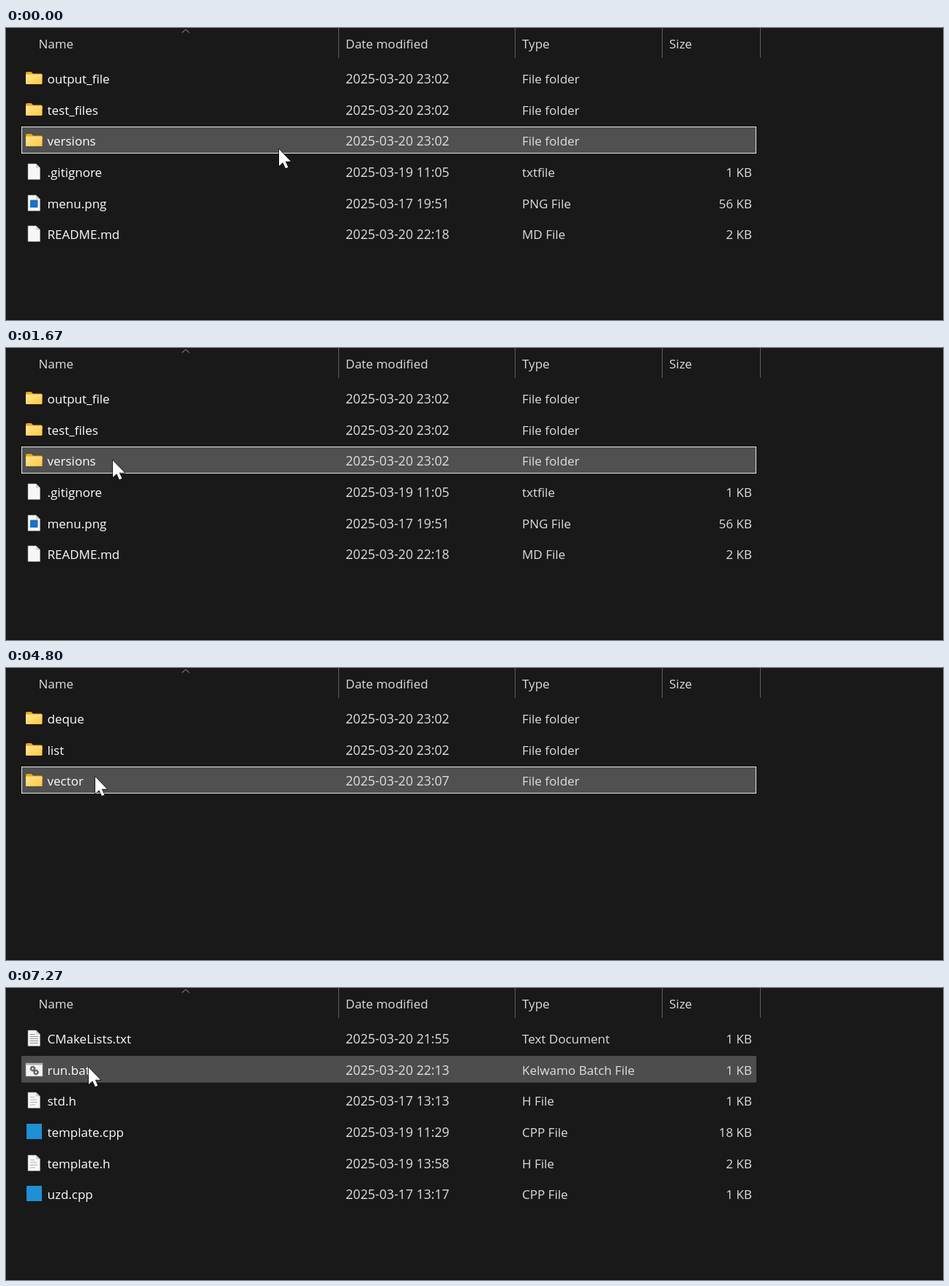
An HTML page that plays this animation: 1280x400 px, repeating every 8000 ms.

```html
<!DOCTYPE html>
<html lang="en">
<head>
<meta charset="utf-8">
<title>File list</title>
<style>
  html, body { margin: 0; width: 100%; height: 100%; overflow: hidden; background: #191919; }
  svg { display: block; }
  text { font: 17px "Open Sans", "Noto Sans", sans-serif; fill: #dedede; white-space: pre; }
  .name { fill: #fff; }
  .date { font-size: 17.65px; }
  .size { text-anchor: end; }
</style>
</head>
<body>
<svg width="1280" height="400" viewBox="0 0 1280 400">
  <defs>
    <linearGradient id="gold" x2="1" y2="1">
      <stop offset="0" stop-color="#ffe59a"/><stop offset="1" stop-color="#ffc83d"/>
    </linearGradient>
    <g id="folder">
      <path d="M27 11.5q0-1.5 1.5-1.5h6l2.5 2.5h11q1.5 0 1.5 1.5v4H27z" fill="#eba50f"/>
      <rect x="27" y="13.5" width="22.5" height="13.5" rx="1.3" fill="url(#gold)"/>
    </g>
    <g id="sheet">
      <path d="M30 8h11l5.500 5.500V29.500H30z" fill="#f7f7f7" stroke="#9a9a9a" stroke-width=".6"/>
      <path d="M41 8v5.500h5.500z" fill="#cfcfcf"/>
    </g>
    <g id="notes">
      <use href="#sheet"/>
      <path d="M32.500 13.500h7M32.500 16.500h11.500M32.500 19.500h11.500M32.500 22.500h11.500M32.500 25.500h11.500" stroke="#8c8c8c"/>
    </g>
    <g id="source">
      <use href="#sheet"/>
      <path d="M33 14.500h6M33 18h9M33 21.500h10M33 25h7" stroke="#b4b4b4"/>
    </g>
    <g id="image">
      <use href="#sheet"/>
      <rect x="33" y="14.500" width="10.500" height="10.500" rx="1" fill="#1a72c4"/>
    </g>
    <g id="batch">
      <rect x="27" y="10" width="23" height="18" fill="#f4f4f4" stroke="#8a8a8a" stroke-width=".7"/>
      <path d="M27.500 11.500h22" stroke="#a9a9a9" stroke-width="2"/>
      <g fill="none" stroke="#555">
        <circle cx="36.500" cy="17.500" r="2.300" stroke-width="1.700"/>
        <circle cx="36.500" cy="17.500" r="3.600" stroke-dasharray="1.400 1.430"/>
        <circle cx="41" cy="22.500" r="2.300" stroke-width="1.700"/>
        <circle cx="41" cy="22.500" r="3.600" stroke-dasharray="1.400 1.430"/>
      </g>
    </g>
    <rect id="code" x="28" y="8" width="21" height="21" fill="#1f8fd6"/>
  </defs>
  <rect width="1280" height="400" fill="#191919"/>
  <rect y="398" width="1280" height="2" fill="#141414"/>
  <g id="header">
    <path d="M240.500 6.500l5-4.500 5 4.500" fill="none" stroke="#a0a0a0"/>
    <path d="M454.500 0V41M695.500 0V41M896.500 0V41M1030.500 0V41" stroke="#5e5e5e"/>
    <text x="44.500" y="28">Name</text>
    <text x="464" y="28">Date modified</text>
    <text x="705" y="28">Type</text>
    <text x="906" y="28">Size</text>
  </g>
  <g id="bars"></g>
  <g id="lists"></g>
  <path id="cursor" d="M0 0V23L5.200 18.200 8.900 26.300 12.400 24.800 8.800 16.800H16z" fill="#fff" stroke="#000" stroke-width="1.200" paint-order="stroke"/>
</svg>
<script>
const LOOP = 8000, FPS = 15;
const $ = id => document.getElementById(id);
const rowTop = i => 50 + i * 42.67;

// icon, name, modified, type, size
const folder = (name, time) => ["folder", name, "2025-03-20 " + time, "File folder", ""];
const lists = [
  [
    folder("output_file", "23:02"),
    folder("test_files", "23:02"),
    folder("versions", "23:02"),
    ["sheet", ".gitignore", "2025-03-19 11:05", "txtfile", "1 KB"],
    ["image", "menu.png", "2025-03-17 19:51", "PNG File", "56 KB"],
    ["sheet", "README.md", "2025-03-20 22:18", "MD File", "2 KB"]
  ],
  [folder("deque", "23:02"), folder("list", "23:02"), folder("vector", "23:07")],
  [
    ["notes", "CMakeLists.txt", "2025-03-20 21:55", "Text Document", "1 KB"],
    ["batch", "run.bat", "2025-03-20 22:13", "Kelwamo Batch File", "1 KB"],
    ["source", "std.h", "2025-03-17 13:13", "H File", "1 KB"],
    ["code", "template.cpp", "2025-03-19 11:29", "CPP File", "18 KB"],
    ["source", "template.h", "2025-03-19 13:58", "H File", "2 KB"],
    ["code", "uzd.cpp", "2025-03-17 13:17", "CPP File", "1 KB"]
  ]
];

// start, visible list, selected row, reacts to the pointer
const states = [
  [0, 0, 2, true],
  [2400, 1, -1, false],
  [2533, 1, -1, true],
  [4800, 1, 2, true],
  [5000, -1, -1, false],
  [5133, 2, -1, false],
  [5267, 2, -1, true]
];

// time, x, y of the pointer tip
const path = [
  [0, 373, 166], [133, 373, 166], [733, 332, 307], [867, 328, 313], [1000, 315, 304],
  [1667, 146, 154], [2933, 146, 154], [3067, 143, 128], [3467, 138, 76],
  [3733, 138, 76], [3933, 138, 98], [4467, 122, 149],
  [5867, 122, 149], [6467, 113, 75], [6867, 113, 75], [7267, 113, 109], [LOOP, 113, 109]
];

const cell = (cls, x, y, str) => `<text class="${cls}" x="${x}" y="${y}">${str}</text>`;

function rowMarkup([icon, name, date, type, size], i) {
  const y = Math.round(rowTop(i) + 26);
  return `<use href="#${icon}" y="${Math.round(rowTop(i))}"/>` +
    cell("name", 56.5, y, name) + cell("date", 464, y, date) +
    cell("type", 705, y, type) + cell("size", 1019, y, size);
}

$("lists").innerHTML = lists.map(rows => `<g>${rows.map(rowMarkup).join("")}</g>`).join("");
const groups = [...$("lists").children];

function bar(row, hovered, selected) {
  const y = Math.round(rowTop(row)), both = hovered && selected;
  const fill = both ? "#505050" : hovered ? "#4d4d4d" : "#333";
  return both
    ? `<rect x="21.5" y="${y + 0.5}" width="1003" height="36" fill="${fill}" stroke="#e6e6e6"/>`
    : `<rect x="21" y="${y}" width="1004" height="36.5" rx="1" fill="${fill}"/>`;
}

function pointer(t) {
  const k = Math.max(1, path.findIndex(p => p[0] >= t));
  const [t0, x0, y0] = path[k - 1], [t1, x1, y1] = path[k];
  const u = (t - t0) / (t1 - t0), e = u * u * (3 - 2 * u);
  return [Math.round(x0 + (x1 - x0) * e), Math.round(y0 + (y1 - y0) * e)];
}

function draw(now) {
  const tick = Math.floor((now % LOOP + 4) * FPS / 1000);
  const t = Math.min(tick * 1000 / FPS, LOOP);
  const [, list, selected, live] = states.findLast(s => s[0] <= t + 1);
  const [x, y] = pointer(t);
  const count = list < 0 ? 0 : lists[list].length;

  let bars = "";
  for (let i = 0; i < count; i++) {
    const hovered = live && y >= rowTop(i) && y < rowTop(i) + 35;
    if (hovered || i === selected) bars += bar(i, hovered, i === selected);
  }
  $("bars").innerHTML = bars;
  groups.forEach((g, i) => g.style.display = i === list ? "" : "none");
  $("header").style.display = list < 0 ? "none" : "";
  $("cursor").setAttribute("transform", `translate(${x} ${y})`);
}

const start = performance.now();
function frame() {
  draw(performance.now() - start);
  requestAnimationFrame(frame);
}
frame();
</script>
</body>
</html>
```
